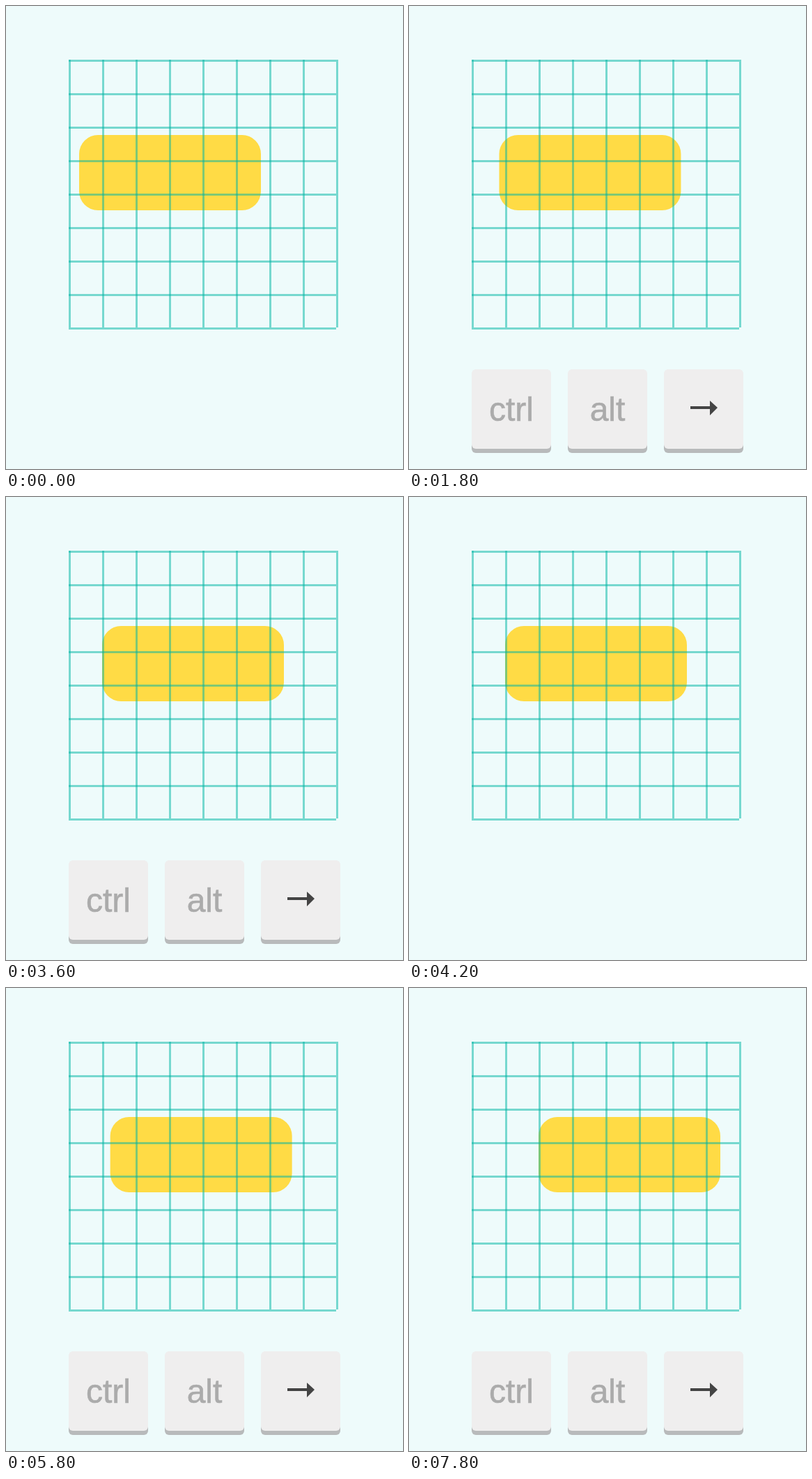
Animation, 570 px wide and 664 px high, one loop 8000 ms. Source, as an HTML page:

```html
<!DOCTYPE html>
<html lang="en">
<head>
<meta charset="utf-8">
<title>Snap to grid</title>
<style>
  html, body { margin: 0; width: 100%; height: 100%; overflow: hidden; background: #eefbfb; }
  svg { display: block; }
  text { font: 48px "Liberation Sans", Arial, sans-serif; fill: #ababab; stroke: #ababab; stroke-width: .6; text-anchor: middle; }
</style>
</head>
<body>
<svg width="570" height="664" viewBox="0 0 570 664">
  <rect width="570" height="664" fill="#eefbfb"/>
  <rect id="block" x="105" y="185" width="261" height="108" rx="27" fill="#ffdb45"/>
  <g id="grid" fill="#00b5a3" fill-opacity=".5"></g>
  <g id="keys" opacity="0">
    <g id="caps"></g>
    <text x="147" y="595">ctrl</text>
    <text x="285" y="595">alt</text>
    <path d="M404 574H432V566L443 576L432 587V578H404Z" fill="#444"/>
  </g>
</svg>
<script>
const LOOP = 8000, CELL = 48, LEFT = 90, TOP = 77, LINE = 3, SPAN = 8 * CELL;
const $ = id => document.getElementById(id);

function addRect(parent, x, y, width, height, attrs = {}) {
  const rect = document.createElementNS("http://www.w3.org/2000/svg", "rect");
  for (const [name, value] of Object.entries({ x, y, width, height, ...attrs })) {
    rect.setAttribute(name, value);
  }
  parent.append(rect);
}

for (let i = 0; i <= 8; i++) {
  addRect($("grid"), LEFT + i * CELL, TOP, LINE, SPAN);
  addRect($("grid"), LEFT, TOP + i * CELL, SPAN, LINE);
}
for (const x of [90, 228, 366]) {
  addRect($("caps"), x, 527, 114, 114, { rx: 6, fill: "#b8babb" });
  addRect($("caps"), x, 521, 114, 114, { rx: 6, fill: "#efeeee" });
}

const progress = (t, start, duration) => Math.min(1, Math.max(0, (t - start) / duration));
const easeOut = u => 1 - (1 - u) ** 3;

function render(t) {
  const snap = easeOut(progress(t, 1674, 350));
  const step = easeOut(progress(t, 5770, 350));
  $("block").setAttribute("x", 105 + 33 * snap + CELL * step);

  const opacity = progress(t, 800, 250) - progress(t, 3900, 250) + progress(t, 4800, 250);
  $("keys").setAttribute("opacity", opacity);
}

const startTime = performance.now();
function tick() {
  render((performance.now() - startTime) % LOOP);
  requestAnimationFrame(tick);
}
tick();
</script>
</body>
</html>
```
